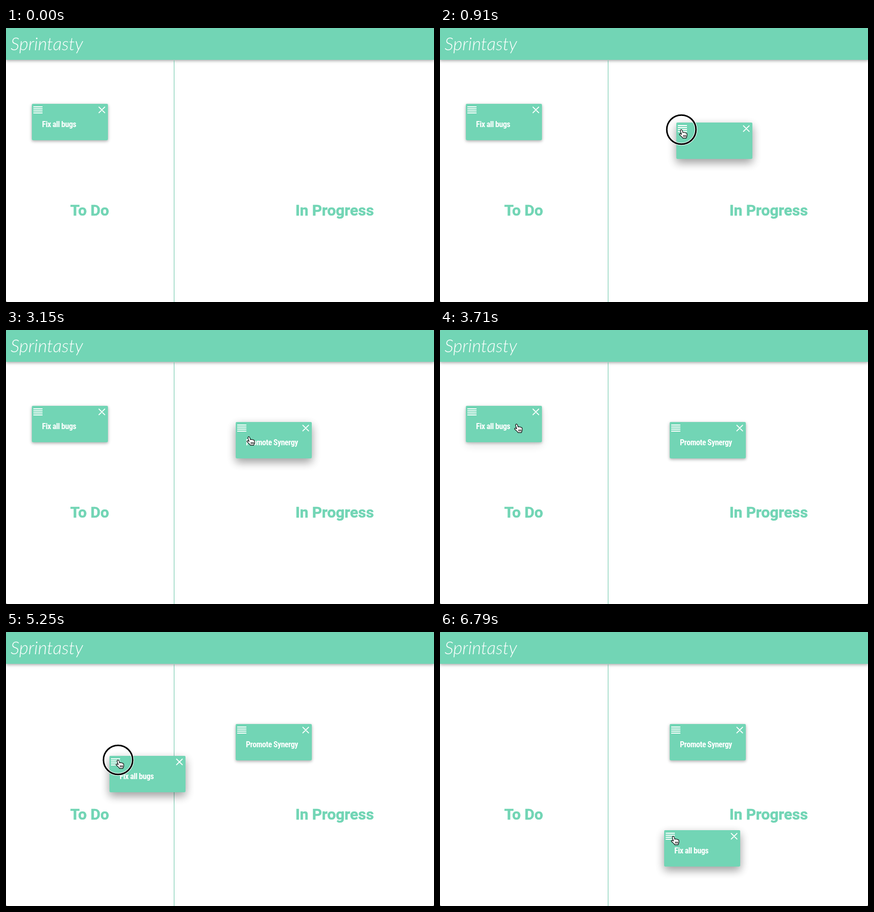
Animation of 844x542 px, one loop 6860 ms. Source, as an HTML page:

```html
<!DOCTYPE html>
<html lang="en">
<head>
<meta charset="utf-8">
<title>Task board</title>
<style>
  :root {
    --mint: #72d5b5;
    --low: 0 2px 5px rgba(0,0,0,.24), 0 2px 8px rgba(0,0,0,.12);
    --high: 0 8px 17px rgba(0,0,0,.24), 0 6px 18px rgba(0,0,0,.18);
  }
  html, body { margin: 0; width: 100%; height: 100%; overflow: hidden; background: #8a8a8a; }
  #stage { position: absolute; left: 0; top: 0; width: 844px; height: 542px; overflow: hidden; background: #fff; border-radius: 3px; }
  header { position: absolute; left: 0; top: 0; width: 844px; height: 63px; background: var(--mint); box-shadow: var(--low); }
  .divider { position: absolute; left: 331px; top: 64px; width: 1px; height: 478px; background: #66c4a6; }
  svg { position: absolute; left: 0; top: 0; overflow: visible; }
  .logo { font: italic 300 35px Lato, "Open Sans", sans-serif; fill: #fff; }
  .title { font: 700 30px Roboto, "Open Sans", sans-serif; fill: var(--mint); stroke: var(--mint); stroke-width: .6; text-anchor: middle; }
  .card { position: absolute; left: 0; top: 0; width: 150px; height: 72px; }
  .card div { position: absolute; inset: 0; border-radius: 2px; }
  .rest { box-shadow: var(--low); }
  .lift { box-shadow: var(--high); }
  .face { background: var(--mint); }
  .icons { fill: none; stroke: #fff; stroke-width: 1.9; }
  .label { font: 700 16px "Roboto Condensed", Roboto, sans-serif; font-stretch: 75%; letter-spacing: -.03em; fill: #fff; }
  .hand { fill: #fff; stroke: #000; stroke-width: 1.15; stroke-linejoin: round; }
</style>
</head>
<body>
<div id="stage">
  <header></header>
  <div class="divider"></div>
  <svg width="844" height="542">
    <text class="logo" x="9" y="44">Sprintasty</text>
    <text class="title" x="165" y="371">To Do</text>
    <text class="title" x="648" y="371">In Progress</text>
  </svg>
  <div id="cards"></div>
  <svg id="pointer" width="1" height="1">
    <g id="ring" fill="none">
      <circle r="28.8" stroke="#fff" stroke-width="5"/>
      <circle r="28.8" stroke="#000" stroke-width="3"/>
    </g>
    <g class="hand">
      <path d="M-1.5 .7C-.4-.5 1.2.2 1.7 1.6L3 6C3.6 5.2 5.2 5 5.8 6C6.8 5.4 8.2 5.8 8.6 6.9C9.7 6.4 10.9 7.2 11 8.4L11.2 11.5C11.2 13.5 10 14.5 9.7 16.8H2.8C2.2 14.6-1.5 12.6-3.6 10.2C-4.6 9-3 7.6-1.6 8.3L.3 9.5L-2 2.5Z"/>
      <path d="M4.3 10.8v3.7M6.5 10.8v3.7M8.7 10.8v3.7"/>
    </g>
  </svg>
</div>
<script>
const LOOP = 6860, STEP = 70;
const NOTE = "Promote Synergy";

const point = (x, y) => ({ x, y });
const glide = (from, until, x, y) => ({ from, until, to: point(x, y) });

// Eased progress from 0 to 1 between two times.
function ease(t, from, until) {
  const k = Math.min(1, Math.max(0, (t - from) / (until - from)));
  return k * k * (3 - 2 * k);
}

// Position after a chain of eased glides.
function follow(t, start, glides) {
  return glides.reduce((at, { from, until, to }) => {
    const k = ease(t, from, until);
    return point(at.x + (to.x - at.x) * k, at.y + (to.y - at.y) * k);
  }, start);
}

function place(el, { x, y }) {
  el.style.transform = `translate(${Math.round(x)}px, ${Math.round(y)}px)`;
}

function show(el, visible) {
  el.style.display = visible ? "" : "none";
}

function makeCard(text) {
  const el = document.createElement("div");
  el.className = "card";
  el.innerHTML = `<div class="rest"></div><div class="lift"></div><div class="face"></div>
    <svg width="150" height="72">
      <path class="icons" d="M3 6h18M3 10h18M3 14h18M3 18h18M131.8 5.8l12.4 12.4M144.2 5.8l-12.4 12.4"/>
      <text class="label" x="20" y="46">${text}</text>
    </svg>`;
  document.getElementById("cards").append(el);
  const find = name => el.querySelector("." + name);
  return { el, rest: find("rest"), lift: find("lift"), label: find("label") };
}

function pose(card, at, lift) {
  place(card.el, at);
  card.lift.style.opacity = lift;
  card.rest.style.opacity = 1 - lift;
}

const newCard = makeCard("");
const bugCard = makeCard("Fix all bugs");
const pointer = document.getElementById("pointer");
const ring = document.getElementById("ring");

// A wider fallback face gets a smaller size.
const size = 16 * Math.min(1, 67.5 / bugCard.label.getComputedTextLength());
for (const card of [newCard, bugCard]) card.label.style.fontSize = size + "px";

// The new card trails the pointer on its way up.
const newCardGlides = [glide(70, 910, 466, 187), glide(910, 1330, 453, 182)];
const bugCardGlides = [glide(5040, 5530, 441, 392), glide(5740, 5810, 442, 392)];
const pointerGlides = [
  glide(70, 770, 476, 201),     // drag the new card
  glide(910, 1330, 463, 196),
  glide(1470, 1960, 479, 211),  // to its text
  glide(3220, 3850, 104, 182),  // over to the other card
  glide(4060, 4480, 89, 157),
  glide(4760, 4970, 68, 158),   // to its handle
  glide(5040, 5530, 458, 400),  // drag it across
  glide(6720, 6790, 460, 404)
];

function render(time) {
  const t = Math.floor((time % LOOP) / STEP) * STEP;
  const started = t >= STEP;
  show(newCard.el, started);
  show(pointer, started);
  show(ring, t < 1470 || (t >= 5040 && t < 5950));

  pose(newCard, follow(t, point(495, 434), newCardGlides), 1 - ease(t, 3290, 3570));
  pose(bugCard, follow(t, point(51, 150), bugCardGlides), ease(t, 3640, 3850));
  place(pointer, follow(t, point(520, 441), pointerGlides));

  const typed = Math.max(0, Math.floor((t - 2100) / STEP) + 1);
  newCard.label.textContent = NOTE.slice(0, typed);
}

const start = performance.now();
function tick() {
  render(performance.now() - start);
  requestAnimationFrame(tick);
}
tick();
</script>
</body>
</html>
```
